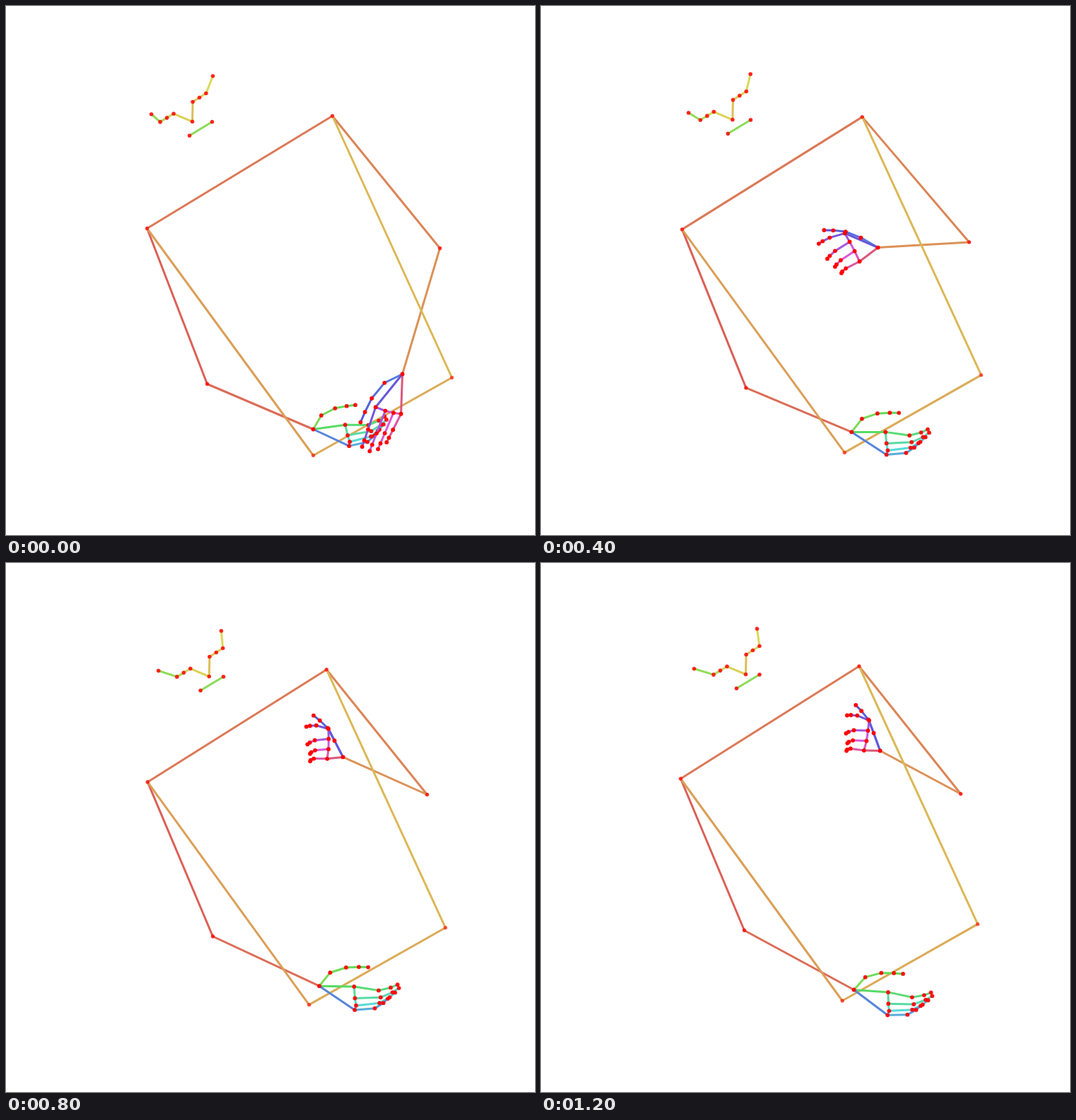
These frames come from a looping animation (748 by 748 pixels, 1.28 s). An HTML page with a canvas:

```html
<!DOCTYPE html>
<html lang="en">
<head>
<meta charset="utf-8">
<title>Skeleton pose</title>
<style>
  html, body { margin: 0; width: 100%; height: 100%; overflow: hidden; background: #fff; }
  canvas { display: block; width: 748px; height: 748px; }
</style>
</head>
<body>
<canvas id="stage" width="748" height="748"></canvas>
<script>
const ctx = document.getElementById("stage").getContext("2d");
const STEP = 80, STEPS = 16;
const KEYS = [0, 2, 4, 6, 8, 12, 15]; // steps at which the key values hold

// Torso: small shifts of four fixed corners.
const torso = {
  drift: [0, 1, 1, -1, 2, -1, -2],
  sway: [0, 0, -3, -12, -11, -8, -13],
  rise: [0, 0.5, 1.5, 1, -2.8, -6.5, -9.5],
  squat: [0, 0, -1.5, -7.5, -13, -8.7, -16.5]
};

const point = (x, y) => ({ x, y });
const elbowL = point([284, 280, 286, 292, 294, 289, 287], [534, 536, 542, 535, 527, 528, 519]);
const elbowR = point([613, 614, 611, 598, 592, 598, 593], [342, 337, 338, 328, 326, 328, 326]);
const wristL = point([434, 429, 433, 443, 443, 442, 442], [598, 596, 598, 605, 597, 599, 603]);
const wristR = point([560, 513, 480, 474, 473, 479, 479], [520, 476, 391, 303, 278, 271, 265]);
const nose = point([263, 262, 268, 273, 282, 289, 289], [163, 166, 161, 160, 160, 160, 157]);

// Hand shapes around the wrist, thumb first:
// angle and distance of the knuckle, then of the fingertip.
const cupped = [
  [-52, 24, -22, 73], [0, 48.5, -2, 109], [18, 52.5, 0.5, 111], [27, 58, 4, 106], [33, 59.5, 9.5, 97]
];
const open = [
  [182, 29, 159, 93], [157, 62, 147, 121], [143, 59, 141, 122], [131, 58, 136, 115], [120, 58, 131, 102]
];
const folded = [
  [169, 28, 161, 77], [169, 48, 146, 72], [158, 35, 126, 57], [135, 25, 112, 50], [100, 24, 99, 50]
];

const handL = {
  wrist: wristL, from: cupped, to: cupped, hue: 103, step: 5.8, alpha: 0.9,
  turn: [-8, -14.5, 0, 0, 0, 2.5, 4],
  size: [0.94, 0.95, 0.97, 1, 1, 1.03, 1],
  fold: KEYS.map(() => 0),
  thumbBow: -4, bow: 7
};
const handR = {
  wrist: wristR, from: open, to: folded, hue: 223, step: 6, alpha: 1,
  turn: [-28, 0, 20, 53.5, 67, 78, 81],
  size: [0.97, 1, 0.97, 1, 0.87, 1, 0.95],
  fold: [0, 0, 0.35, 1, 1, 1, 1],
  thumbBow: 4, bow: 0
};

const mix = (a, b, t) => a + (b - a) * t;

// Smooth interpolation through the keys that never overshoots.
function value(track, step) {
  const last = KEYS.length - 1;
  const slope = i => (track[i + 1] - track[i]) / (KEYS[i + 1] - KEYS[i]);
  const tangent = i => {
    if (i === 0) return slope(0);
    if (i === last) return slope(i - 1);
    const a = slope(i - 1), b = slope(i);
    return a * b > 0 ? 2 * a * b / (a + b) : 0;
  };
  let k = 0;
  while (k < last - 1 && step >= KEYS[k + 1]) k++;
  const span = KEYS[k + 1] - KEYS[k], u = (step - KEYS[k]) / span;
  const bend = u * (1 - u) * span * ((1 - u) * tangent(k) - u * tangent(k + 1));
  return mix(track[k], track[k + 1], u * u * (3 - 2 * u)) + bend;
}

const at = (p, step) => [value(p.x, step), value(p.y, step)];

function link(a, b, hue) {
  ctx.strokeStyle = `hsl(${hue}, 65%, 60%)`;
  ctx.beginPath();
  ctx.moveTo(...a);
  ctx.lineTo(...b);
  ctx.stroke();
}

function dots(points, radius, alpha) {
  ctx.fillStyle = `rgba(255, 0, 0, ${alpha})`;
  for (const [x, y] of points) {
    ctx.beginPath();
    ctx.arc(x, y, radius, 0, Math.PI * 2);
    ctx.fill();
  }
}

function drawBody(step) {
  const [drift, sway, rise, squat] =
    [torso.drift, torso.sway, torso.rise, torso.squat].map(t => value(t, step));
  const [el, er, wl, wr] = [elbowL, elbowR, wristL, wristR].map(p => at(p, step));
  const sl = [199 + drift, 314 + rise], sr = [461 + sway * 0.9, 155 + rise];
  const hl = [434 + sway * 0.65, 635 + squat], hr = [630 + sway, 525 + squat * 0.9];
  [[sl, el], [el, wl], [sl, sr], [sr, er], [er, wr], [sl, hl], [hl, hr], [sr, hr]]
    .forEach(([a, b], i) => link(a, b, 4 + i * 5.7));
  dots([sl, sr, el, er, wl, wr], 2.7, 0.75);
  dots([hl, hr], 2.7, 0.6);
}

// Ears and mouth shift as the head turns; the eyes ride on the nose.
function drawFace(step) {
  const n = at(nose, step), turn = (n[0] - 263) / 26;
  const place = (x, y) => [n[0] + x, n[1] + y];
  const eye = (x, y, dx, dy) => [0, 1, 2].map(i => place(x + dx * i, y + dy * i));
  const right = [n, ...eye(0.6, -28, 9.4, -6), place(29 - 13 * turn, -64.5)];
  const left = [n, ...eye(-26.5, -11.2, -9.5, 5.8), place(-58 - 15 * turn, -10.5 + 2.5 * turn)];
  const lips = [place(-4 - 9 * turn, 19.8), place(28 - 8.5 * turn, 0.3)];
  for (let i = 0; i < 4; i++) {
    link(right[i], right[i + 1], 47 + i * 4);
    link(left[i], left[i + 1], 56 + i * 12.5);
  }
  link(...lips, 96);
  dots([...right, ...left.slice(1), ...lips], 2.8, 0.83);
}

// Four joints from knuckle to tip, bowed sideways.
function finger(a, b, middle, outer, bow) {
  const dx = b[0] - a[0], dy = b[1] - a[1], len = Math.hypot(dx, dy);
  const joint = (t, side) => [a[0] + dx * t - dy / len * side, a[1] + dy * t + dx / len * side];
  return [a, joint(middle, bow), joint(outer, bow * 0.55), b];
}

function drawHand(step, hand) {
  const wrist = at(hand.wrist, step);
  const [turn, size, fold] = [hand.turn, hand.size, hand.fold].map(t => value(t, step));
  const polar = (deg, r) => {
    const a = (deg + turn) * Math.PI / 180;
    return [wrist[0] + Math.cos(a) * r * size, wrist[1] + Math.sin(a) * r * size];
  };
  const fingers = hand.from.map((row, f) => {
    const [ka, kr, ta, tr] = row.map((v, i) => mix(v, hand.to[f][i], fold));
    const ends = [polar(ka, kr), polar(ta, tr)];
    if (f === 0) return finger(...ends, 0.43, 0.76, hand.thumbBow);
    const curl = fold * (f - 1);
    return finger(...ends, 0.56 + curl * 0.07, 0.84 + curl * 0.04, hand.bow + fold * 3);
  });

  let hue = hand.hue;
  const join = (a, b) => {
    link(a, b, hue);
    hue += hand.step;
  };
  fingers.forEach((joints, f) => {
    const root = f < 2 ? wrist : fingers[f - 1][0];
    joints.forEach((joint, i) => join(i ? joints[i - 1] : root, joint));
  });
  join(wrist, fingers[4][0]);
  dots([wrist, ...fingers.flat()], 2.9, hand.alpha);
}

function draw(step) {
  ctx.setTransform(1, 0, 0, 1, 0, 0);
  ctx.fillStyle = "#fff";
  ctx.fillRect(0, 0, 748, 748);
  ctx.translate(0.5, 0.5);
  ctx.lineWidth = 3;
  ctx.lineCap = "round";
  drawBody(step);
  drawFace(step);
  drawHand(step, handL);
  drawHand(step, handR);
}

function tick() {
  draw(Math.floor(performance.now() / STEP) % STEPS);
  requestAnimationFrame(tick);
}
tick();
</script>
</body>
</html>
```
